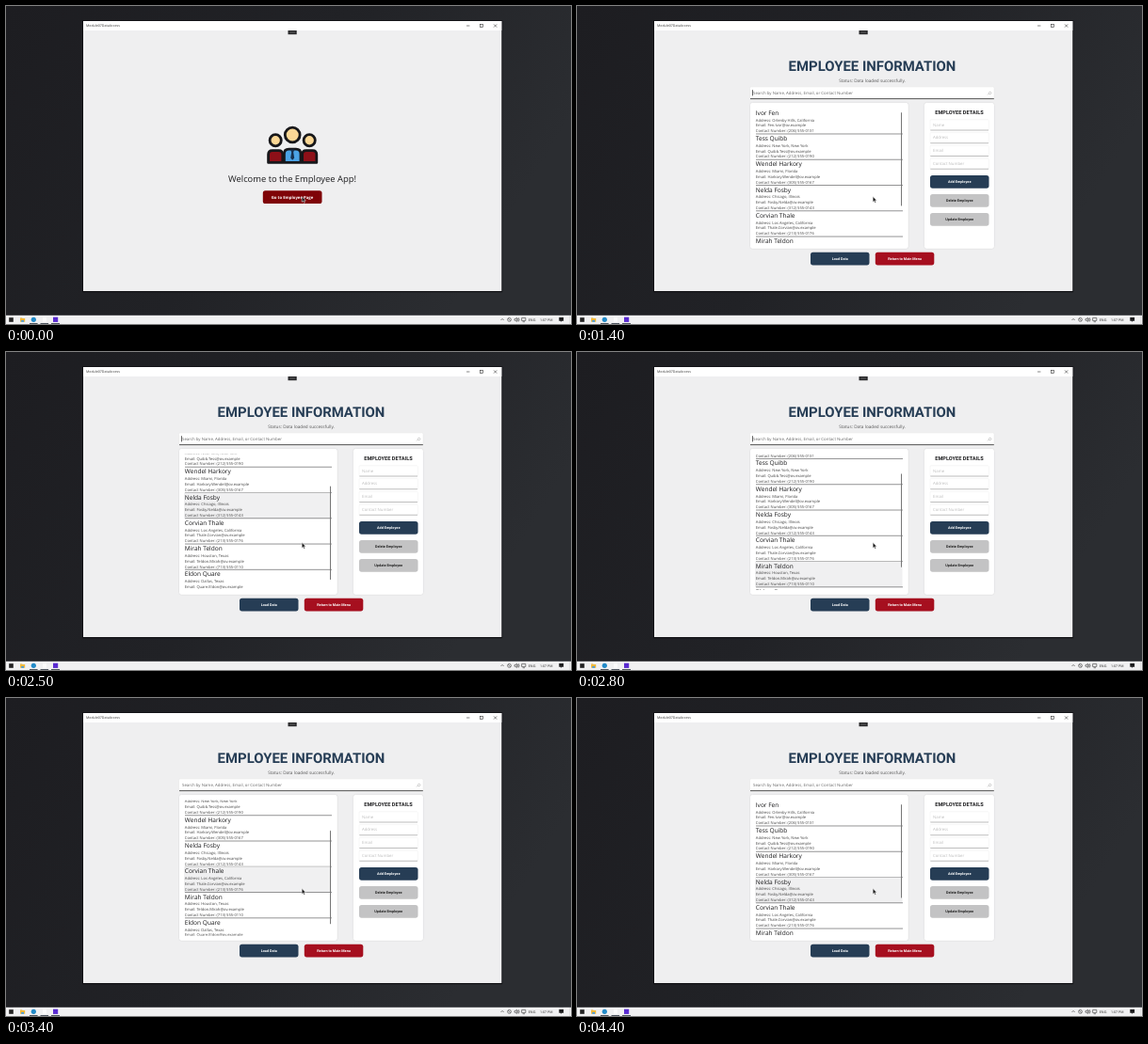
These frames come from a looping animation (600x338 px, 4.5 s). An HTML page:

```html
<!DOCTYPE html>
<html lang="en">
<head>
<meta charset="utf-8">
<title>Employee App</title>
<style>
  html, body { margin: 0; width: 100%; height: 100%; overflow: hidden; background: #1f1f23; }
  svg { display: block; width: 600px; height: 338px; }
  text { font-family: "Open Sans", sans-serif; text-rendering: geometricPrecision; white-space: pre; }
  .head { font-family: Roboto, sans-serif; font-weight: 700; }
  .bold { font-weight: 700; }
</style>
</head>
<body>
<svg id="stage" viewBox="0 0 600 338" xmlns="http://www.w3.org/2000/svg">
  <defs>
    <linearGradient id="desk" x1="0" y1="0" x2="1" y2="0.35">
      <stop offset="0" stop-color="#1d1d21"/>
      <stop offset="0.55" stop-color="#212226"/>
      <stop offset="1" stop-color="#2b2d31"/>
    </linearGradient>
    <clipPath id="listClip"><rect x="186" y="108.5" width="162" height="144.3"/></clipPath>
  </defs>
  <rect width="600" height="338" fill="url(#desk)"/>
  <rect x="81" y="15.2" width="446.2" height="289" fill="#111114"/>
  <rect x="82" y="16" width="444.3" height="287" fill="#efeff0"/>
  <rect x="82" y="16" width="444.3" height="10" fill="#fff"/>
  <g fill="none" stroke="#333" stroke-width="0.6">
    <path d="M489 21h3.4M518 19.4l3.2 3.2M521.2 19.4l-3.2 3.2"/>
    <rect x="503.5" y="19.4" width="3.1" height="3.1"/>
  </g>
  <rect x="299.5" y="26" width="9.2" height="4.2" fill="#29292b"/>
  <path d="M301.3 28h5.6" stroke="#888" stroke-width="0.6"/>

  <g id="welcome">
    <g stroke="#17171a" stroke-width="2.8" stroke-linejoin="round">
      <g id="sideMan">
        <circle cx="286.2" cy="142.8" r="6.1" fill="#fbd795"/>
        <path d="M278.6 166.4v-8.6q0-4.2 4.2-4.2h6.800q4.200 0 4.200 4.200v8.600z" fill="#8d1018"/>
      </g>
      <use href="#sideMan" transform="matrix(-1 0 0 1 608.4 0)"/>
      <path d="M295.400 166.400v-9.200q0-5 5-5h7.600q5 0 5 5v9.200z" fill="#4ba3e6"/>
      <circle cx="304.200" cy="137" r="7.900" fill="#fbd795"/>
    </g>
    <path d="M302 152.500h4.400l-1.200 3 1 6-2 2.200-2-2.200 1-6z" fill="#17304e"/>
    <rect x="272.800" y="196.200" width="62.700" height="13.800" rx="2.600" fill="#7f0307"/>
  </g>

  <g id="staff">
    <rect x="183.500" y="85.800" width="259.600" height="13" rx="1.500" fill="#fff" stroke="#e2e2e2" stroke-width="0.500"/>
    <path d="M184 98.600h258.800" stroke="#444" stroke-width="0.900"/>
    <path d="M438.600 91.200a1.300 1.300 0 1 0 .01 0M437.500 93l-1.500 1.500" fill="none" stroke="#999" stroke-width="0.500"/>
    <path id="caret" d="M186.500 89.200v6.200" stroke="#222" stroke-width="0.700"/>
    <g fill="#fff" stroke="#dedee0" stroke-width="0.700">
      <rect x="183.500" y="102.400" width="168.700" height="155.900" rx="3"/>
      <rect x="368.400" y="102.400" width="75" height="155.900" rx="3"/>
    </g>
    <g clip-path="url(#listClip)"><g id="rows"></g></g>
    <rect id="thumb" x="344" y="113" width="1" height="99.500" rx="0.500" fill="#777"/>
  </g>

  <rect y="328.800" width="600" height="9.200" fill="#f1f1f2"/>
  <rect x="3.200" y="331.200" width="4.600" height="4.600" fill="#222"/>
  <path d="M15 331.400h2l.6.700h2.600v3.700h-5.200z" fill="#f0b93c"/>
  <rect x="16.200" y="334" width="2.800" height="1.800" fill="#4b9ddb"/>
  <circle cx="29.300" cy="333.300" r="2.600" fill="#238bc8"/>
  <rect x="39" y="331" width="4" height="4.800" fill="#fafafa"/>
  <rect x="50" y="330.700" width="5.200" height="5.200" fill="#5a2bd0"/>
  <path d="M25 337.500h8.600M36.500 337.500h8.600M48 337.500h9" stroke="#3d4650" stroke-width="0.900"/>
  <g fill="none" stroke="#333" stroke-width="0.600">
    <path d="M525.500 334l1.600-1.600 1.600 1.600"/>
    <circle cx="534.500" cy="333.400" r="1.900"/>
    <path d="M533.200 332.100l2.600 2.600M540 332.600h1l1.400-1.300v4.200l-1.400-1.300h-1zM543.400 332q1 1.400 0 2.800M544.300 331.300q1.500 2.100 0 4.200"/>
    <path d="M547.600 331.600h4.200v2.800h-4.200zM548.600 335.700h2.400"/>
  </g>
  <path d="M587.300 331h4.800v3.700h-2l-1 1.200v-1.200h-1.800z" fill="#1c1c1e"/>
  <path d="M598.500 329v9" stroke="#ccc" stroke-width="0.400"/>
  <path id="pointer" d="M314.200 202.600v5.800l1.300-1.200 1 2.100 1-.5-1-2h1.800z" fill="#111" stroke="#fff" stroke-width="0.500"/>
</svg>
<script>
const LOOP = 4500, STEP = 100, PITCH = 27.27, TOP = 108.8;
const $ = id => document.getElementById(id);
const [stage, welcome, staff, rows] = ["stage", "welcome", "staff", "rows"].map($);

function add(parent, tag, attrs, content = "") {
  const el = document.createElementNS("http://www.w3.org/2000/svg", tag);
  for (const k in attrs) el.setAttribute(k, attrs[k]);
  el.textContent = content;
  parent.appendChild(el);
  return el;
}

const label = (parent, str, x, y, size, fill, more = {}) =>
  add(parent, "text", { x, y, "font-size": size, fill, ...more }, str);

const mid = (parent, str, x, y, size, fill, cls = "") =>
  label(parent, str, x, y, size, fill, { "text-anchor": "middle", class: cls });

function button(str, x, y, fill, ink) {
  add(staff, "rect", { x, y, width: 62.5, height: 13.7, rx: 2.6, fill });
  mid(staff, str, x + 31.25, y + 8.3, 3.8, ink, "head");
}

label(stage, "Module07DataAccess", 85, 22.4, 3.6, "#333");
label(stage, "ENG", 554.8, 334.8, 3.7, "#222");
label(stage, "1:07 PM", 567, 334.8, 3.6, "#222");

mid(welcome, "Welcome to the Employee App!", 304, 187, 9.4, "#1c1c1e");
mid(welcome, "Go to Employee Page", 304, 204.8, 4.3, "#fff", "bold");

mid(staff, "EMPLOYEE INFORMATION", 313.5, 68.5, 14.9, "#263d55", "head");
mid(staff, "Status: Data loaded successfully.", 313.5, 80.6, 4.7, "#555");
label(staff, "Search by Name, Address, Email, or Contact Number", 187, 93.9, 4.35, "#666");
mid(staff, "EMPLOYEE DETAILS", 406, 114.6, 5.62, "#1c1c1e", "head");

["Name", "Address", "Email", "Contact Number"].forEach((str, i) => {
  const y = 120.8 + i * 13.75;
  add(staff, "rect", { x: 375, y, width: 62.3, height: 11.2, rx: 1, fill: "#fff", stroke: "#ececec", "stroke-width": 0.5 });
  add(staff, "path", { d: `M375.3 ${y + 11.2}h61.7`, stroke: "#999", "stroke-width": 0.6 });
  label(staff, str, 378, y + 6.8, 4.3, "#bcbcbc");
});

button("Add Employee", 375, 180, "#263d55", "#fff");
button("Delete Employee", 375, 200, "#c3c3c4", "#222");
button("Update Employee", 375, 220, "#c3c3c4", "#222");
button("Load Data", 248, 261.7, "#263d55", "#fff");
button("Return to Main Menu", 316.8, 261.7, "#a60f1f", "#fff");

const people = [
  ["Ivor", "Fen", "Orlenby Hills, California", "(206) 555-0131"],
  ["Tess", "Quibb", "New York, New York", "(212) 555-0190"],
  ["Wendel", "Harkory", "Miami, Florida", "(305) 555-0167"],
  ["Nelda", "Fosby", "Chicago, Illinois", "(312) 555-0143"],
  ["Corvian", "Thale", "Los Angeles, California", "(213) 555-0176"],
  ["Mirah", "Teldon", "Houston, Texas", "(713) 555-0110"],
  ["Eldon", "Quare", "Dallas, Texas", "(214) 555-0158"]
];

const cells = people.map(([first, last, city, phone], i) => {
  const y = TOP + i * PITCH;
  const cell = add(rows, "rect", { x: 189, y, width: 156.5, height: PITCH, fill: "#f0f0f1" });
  label(rows, `${first} ${last}`, 189.8, y + 6.9, 6.55, "#1a1a1c");
  [`Address: ${city}`, `Email: ${last}.${first}@ov.example`, `Contact Number: ${phone}`]
    .forEach((str, n) => label(rows, str, 189.8, y + 13.7 + n * 5.85, 4.1, "#444"));
  add(rows, "path", { d: `M190 ${y + PITCH - 0.1}h156`, stroke: "#4a4a4c", "stroke-width": 0.6 });
  return cell;
});

// [time, value]
const scroll = [
  [2200, 0], [2300, 10], [2400, 27], [2500, 41], [2600, 47], [2700, 39], [2800, 22.5],
  [2900, 8], [3000, 0], [3100, 16], [3200, 36], [3400, 38.5], [3500, 33],
  [3600, 17], [3700, 6.5], [3800, 2], [3900, 0]
];
const hover = [[0, -1], [1600, 3], [2700, 5], [3000, 3], [3300, 4], [3900, 3]];
const caretOn = [[0, 1], [2900, 0], [3500, 1], [4100, 0]];

const held = (table, t) => table.filter(([at]) => at <= t).pop()[1];

function between(table, t) {
  const i = table.findIndex(([at]) => at >= t);
  if (i <= 0) return 0;
  const [t0, a] = table[i - 1], [t1, b] = table[i];
  return a + (b - a) * (t - t0) / (t1 - t0);
}

const show = (el, on) => { el.style.display = on ? "" : "none"; };

function draw(now) {
  const t = Math.floor(now % LOOP / STEP) * STEP;
  const y = between(scroll, t), over = held(hover, t);
  show(welcome, t < 1400);
  show(staff, t >= 1400);
  show($("caret"), held(caretOn, t));
  rows.setAttribute("transform", `translate(0 ${-y})`);
  $("thumb").setAttribute("y", 113 + y * 0.72);
  cells.forEach((cell, i) => show(cell, i === over));
}

stage.appendChild($("pointer"));
const start = performance.now();
function tick() {
  draw(performance.now() - start);
  requestAnimationFrame(tick);
}
tick();
</script>
</body>
</html>
```
